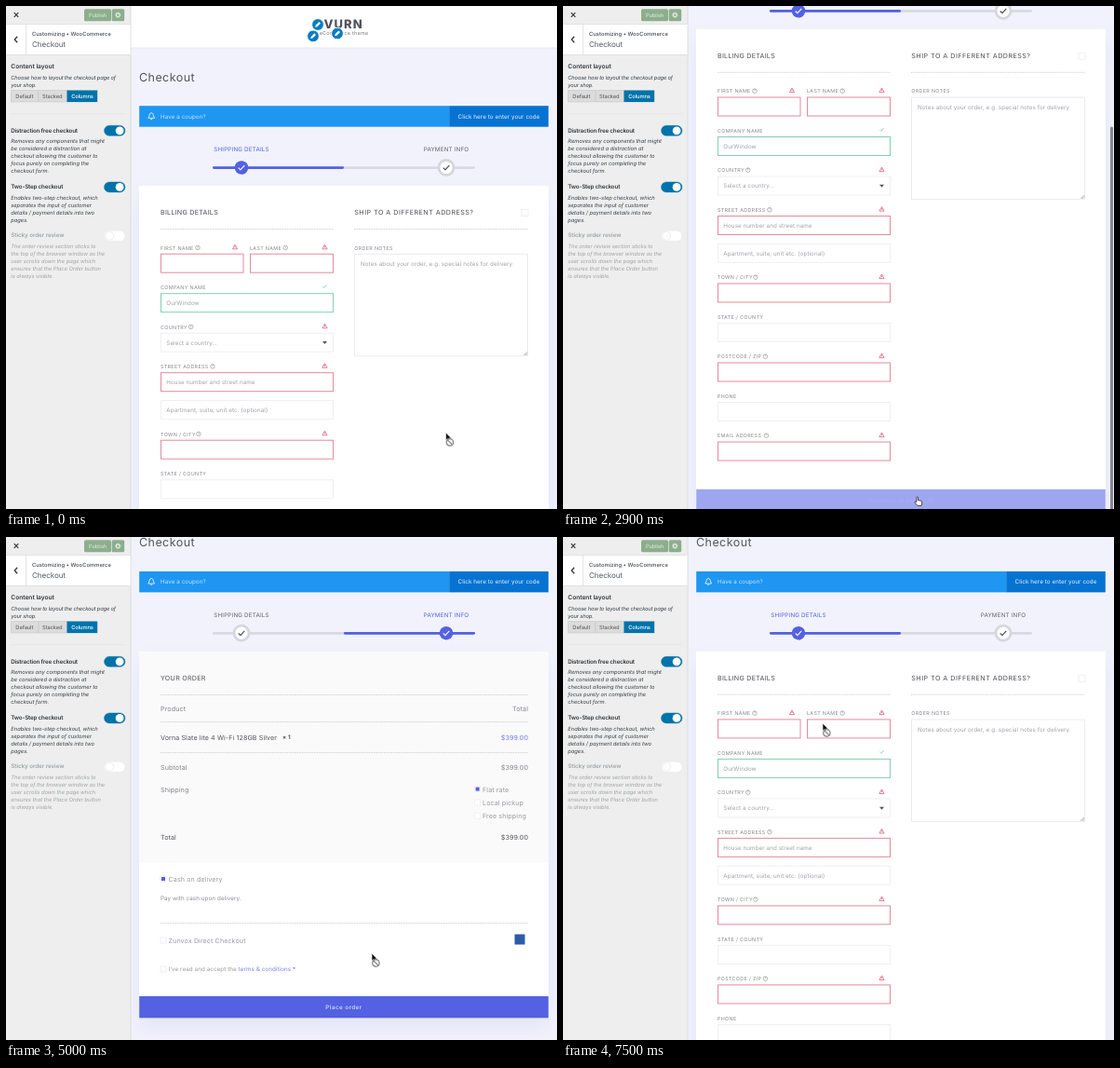
Recreate the animation shown at these times as an HTML page. Size 592 by 540 pixels, loop 7600 ms.

```html
<!DOCTYPE html>
<html lang="en">
<head>
<meta charset="utf-8">
<title>Checkout layout preview</title>
<style>
html, body { margin: 0; width: 100%; height: 100%; overflow: hidden; background: #f1f2fb; }
svg { display: block; width: 592px; height: 540px; font-family: Inter, "Open Sans", sans-serif; text-rendering: geometricPrecision; }
.card { filter: drop-shadow(0 12px 10px #5361e214); }
</style>
</head>
<body>
<svg id="stage" viewBox="0 0 592 540"></svg>
<script>
const BLUE = '#5361e2', RED = '#e58a9e', GREEN = '#80d0b0', PALE = '#f0f0f3', WP = '#0073aa';

// y is the vertical middle of the capitals
function text(x, y, str, { size = 6.26, fill = '#999', weight = 400, anchor = 'start', ls = .013, style = 'normal' } = {}) {
  return `<text x="${x}" y="${y + size * .36}" font-size="${size}" fill="${fill}" font-weight="${weight}" ` +
    `text-anchor="${anchor}" letter-spacing="${ls}em" font-style="${style}">${str}</text>`;
}
const rect = (x, y, w, h, fill, more = '') =>
  `<rect x="${x}" y="${y}" width="${w}" height="${h}" fill="${fill}" ${more}/>`;
const path = (d, stroke, width = 1, fill = 'none') =>
  `<path d="${d}" stroke="${stroke}" stroke-width="${width}" fill="${fill}" stroke-linejoin="round"/>`;
const circle = (x, y, r, fill, more = '') => `<circle cx="${x}" cy="${y}" r="${r}" fill="${fill}" ${more}/>`;
const box = (x, y, w, h, stroke) => rect(x + .5, y + .5, w - 1, h - 1, '#fff', `stroke="${stroke}"`);
const dotted = (x1, x2, y) => `<path d="M${x1} ${y}H${x2}" stroke="#cacace" stroke-width=".8" stroke-dasharray="1 .6"/>`;
const group = (id, content, more = '') => `<g id="${id}" ${more}>${content}</g>`;
const tick = (x, y, k, color, width) =>
  path(`M${x - 3 * k} ${y}l${2 * k} ${2 * k}l${4 * k} ${-4.4 * k}`, color, width);

/* ---------- sidebar ---------- */
function toggle(y, on) {
  return rect(105.5, y, 22.5, 11, on ? WP : '#fff', `rx="5.5" stroke="${on ? WP : '#e2e2e2'}" stroke-width=".4"`) +
    circle(on ? 122.1 : 111.3, y + 5.5, 4.4, '#fff', on ? '' : 'stroke="#ddd" stroke-width=".5"');
}
function section(y, title, lines, { on = true, size = 6.26, titleLs = -.03, ls = -.006 } = {}) {
  return text(5.3, y, title, { size, fill: on ? '#32373c' : '#a0a4a8', weight: 600, ls: titleLs }) +
    lines.map((s, i) => text(5.3, y + 11.6 + i * 8, s,
      { size: 5.81, fill: on ? '#3c4146' : '#a0a3a6', ls, style: 'italic', weight: 450 })).join('');
}
function sidebar() {
  const mid = { size: 5.81, ls: -.02, anchor: 'middle', fill: '#555' };
  return rect(0, 0, 134, 540, '#eee') + rect(133.5, 0, 1, 540, '#dcdcde') +
    path('M8.7 7.2l4.6 4.6M13.3 7.2l-4.6 4.6', '#32373c', 1.2) +
    rect(84, 3.2, 29, 13, '#8cae8c', 'rx="1.5"') + rect(113.7, 3.2, 13.5, 13, '#8cae8c', 'rx="1.5"') +
    text(98.6, 9.7, 'Publish', { ...mid, fill: '#e2ede2' }) +
    circle(120.3, 9.7, 1.8, 'none', 'stroke="#e8f1e8" stroke-width="1.2"') +
    circle(120.3, 9.7, 2.8, 'none', 'stroke="#e8f1e8" stroke-width=".8" stroke-dasharray="1.1 1.1"') +
    rect(0, 19, 133.5, 33.5, '#fff') + rect(0, 19, 133.5, .8, '#ddd') + rect(0, 52, 133.5, .8, '#ddd') + rect(21, 19, .8, 33, '#ddd') +
    path('M12.2 32.8l-3 3.2l3 3.2', '#32373c', 1.3) +
    text(28, 30, 'Customizing • WooCommerce', { size: 5.81, fill: '#444a50', ls: .008, weight: 500 }) +
    text(28, 41.6, 'Checkout', { size: 8.05, fill: '#555d66', ls: -.007 }) +
    section(65, 'Content layout', ['Choose how to layout the checkout page of', 'your shop.'], { size: 6.6, titleLs: 0, ls: -.03 }) +
    rect(5.5, 90.7, 60, 12.2, '#dcdcdc', 'stroke="#c8c8c8" stroke-width=".7"') + rect(34.5, 90.7, .7, 12.2, '#c2c2c2') +
    rect(65.5, 90.5, 32.7, 12.6, WP) +
    text(19.8, 97, 'Default', mid) + text(49.8, 97, 'Stacked', mid) + text(82, 97, 'Columns', { ...mid, fill: '#fff', weight: 500 }) +
    rect(5, 115.5, 123, .8, '#e6e6e6') +
    section(133.5, 'Distraction free checkout', ['Removes any components that might', 'be considered a distraction at',
      'checkout allowing the customer to', 'focus purely on completing the', 'checkout form.']) + toggle(128.3, true) +
    section(194, 'Two-Step checkout', ['Enables two-step checkout, which', 'separates the input of customer',
      'details / payment details into two', 'pages.']) + toggle(188.9, true) +
    section(246, 'Sticky order review', ['The order review section sticks to', 'the top of the browser window as the',
      'user scrolls down the page which', 'ensures that the Place Order button', 'is always visible.'], { on: false, titleLs: -.01 }) + toggle(241.3, false);
}

/* ---------- page header ---------- */
function pencil(x, y) {
  return circle(x, y, 6.4, '#0a7cc0', 'stroke="#fff" stroke-width="1"') +
    path(`M${x - 2.8} ${y + 2.8}l.6 -2.2l3.6 -3.6l1.6 1.6l-3.6 3.6z`, 'none', 0, '#fff');
}
function header() {
  return rect(134, 0, 458, 45, '#fff') + rect(134, 44.6, 458, .8, '#e4e4ee') +
    text(341.5, 19, 'VURN', { size: 13, fill: '#50525e', weight: 800, ls: .08 }) +
    text(363, 29, 'eCommerce theme', { size: 5.4, fill: '#777', anchor: 'middle', ls: .05 }) +
    pencil(335, 20) + pencil(330, 32.3) + pencil(356, 29.5) +
    text(143, 76.2, 'Checkout', { size: 12.5, fill: '#55555d', ls: .035 }) +
    rect(143.2, 107.2, 333, 22.5, '#1e96f2') + rect(476.2, 107.2, 106.6, 22.5, '#0673d2') +
    path('M152.8 120.3c1.4 -1 .8 -5.6 3.4 -5.6s2 4.6 3.4 5.6zM155.2 121.6h2', '#fff', .8) +
    text(166, 118.3, 'Have a coupon?', { fill: '#c5e4ff' }) +
    text(529.5, 118.3, 'Click here to enter your code', { fill: '#e6f3ff', anchor: 'middle' });
}
function steps(active) {
  const step = (x, label, on) =>
    text(x, 154, label, { fill: on ? BLUE : '#62626c', anchor: 'middle', ls: .03 }) +
    (on ? circle(x, 173.5, 7.3, BLUE) : circle(x, 173.5, 8, '#fff', 'stroke="#d6d6de" stroke-width="2.8"')) +
    tick(x, 173.7, 1.1, on ? '#fff' : '#44445c', 1.1);
  return rect(222, 172.2, 282, 2.8, '#d9d9e2', 'rx="1.4"') + rect(active ? 363 : 222, 172.2, 141, 2.8, BLUE, 'rx="1.4"') +
    step(253, 'SHIPPING DETAILS', !active) + step(473, 'PAYMENT INFO', active);
}

/* ---------- billing page ---------- */
const label = (x, y, str) => text(x, y, str, { size: 5.4, fill: '#85858d', ls: .06 });
const help = (x, y) => circle(x, y, 2.3, 'none', 'stroke="#888" stroke-width=".6"') +
  text(x, y, '?', { size: 3.6, fill: '#777', anchor: 'middle' });
const warn = (x, y) => path(`M${x} ${y - 2.4}l2.6 4.6h-5.2zM${x} ${y - .8}v1.6`, '#e2607c', .8);

function field(y, name, { x = 166, w = 186, state = '', stroke = { bad: RED, good: GREEN }[state] || PALE, hint = '', helpX = 0 } = {}) {
  const end = x + w - 9.5;
  return (name && label(x, y, name)) + (helpX ? help(helpX, y - .2) : '') +
    (state === 'bad' ? warn(end, y - 1) : '') + (state === 'good' ? tick(end, y - 1, .7, GREEN, .9) : '') +
    box(x, y + 6.1, w, 21, stroke) + text(x + 6.3, y + 16.8, hint, { fill: '#a2a2aa' });
}
function billing() {
  const bad = (helpX, more) => ({ state: 'bad', helpX, ...more });
  const title = { size: 7.15, fill: '#4c4c54' };
  return rect(143, 193, 440, 517, '#fff', 'class="card"') +
    text(166, 221.6, 'BILLING DETAILS', { ...title, ls: .035 }) + dotted(166, 352, 239.5) +
    text(374.3, 221.6, 'SHIP TO A DIFFERENT ADDRESS?', { ...title, ls: .067 }) + dotted(374, 561, 239.5) +
    box(553.5, 218, 8, 8, PALE) +
    field(259.6, 'FIRST NAME', bad(205.9, { w: 89.5 })) +
    field(259.6, 'LAST NAME', bad(300.2, { x: 262, w: 90 })) +
    field(302.1, 'COMPANY NAME', { state: 'good', hint: 'OurWindow' }) +
    field(344.6, 'COUNTRY', bad(198.7, { hint: 'Select a country…', stroke: PALE })) +
    path('M340 360h5l-2.5 3z', 'none', 0, '#555') +
    field(387.1, 'STREET ADDRESS', bad(221.9, { hint: 'House number and street name' })) +
    field(416.9, '', { hint: 'Apartment, suite, unit etc. (optional)' }) +
    field(459.6, 'TOWN / CITY', bad(206.9)) +
    field(502.1, 'STATE / COUNTY') +
    field(544.6, 'POSTCODE / ZIP', bad(217.4)) +
    field(587.1, 'PHONE') +
    field(629.6, 'EMAIL ADDRESS', bad(218.5)) +
    label(374.3, 259.6, 'ORDER NOTES') + box(374, 265.8, 187, 110.5, '#ececf0') +
    text(381, 277.2, 'Notes about your order, e.g. special notes for delivery.', { fill: '#a2a2aa' }) +
    path('M556.5 375l3.5 -3.5M558.5 375l1.5 -1.5', '#777', .7) +
    group('next', rect(143.2, 687, 439.6, 23.3, BLUE)) +
    group('nextText', text(363, 698.8, 'Continue to payment', { fill: '#e4e6ff', anchor: 'middle', weight: 500, ls: .06 }));
}

/* ---------- payment page, laid out at its resting scroll ---------- */
const REST = 70.3;

function payment() {
  const big = { size: 7.15, fill: '#85858d' }, dark = { ...big, fill: '#55555d' };
  const right = (y, str, style) => text(561, y, str, { ...style, anchor: 'end' });
  const choice = (x, y, on) => box(x - 3.5, y - 3.5, 7, 7, PALE) + (on ? rect(x - 2, y - 2, 4, 4, BLUE) : '');
  return rect(143, 123, 440, 393, '#fff', 'class="card"') + rect(143, 123, 440, 226.5, '#fafafa') +
    text(166, 151.3, 'YOUR ORDER', { ...dark, ls: .035 }) +
    [169.5, 198.5, 231.5, 414.5].map(y => dotted(166, 561, y)).join('') +
    text(166, 184, 'Product', big) + right(184, 'Total', big) +
    text(166, 215, 'Vorna Slate lite 4 Wi-Fi 128GB Silver', dark) +
    text(297, 215, '× 1', { fill: '#44444c', weight: 600 }) + right(215, '$399.00', { ...big, fill: '#6f7ae8' }) +
    text(166, 247.3, 'Subtotal', big) + right(247.3, '$399.00', big) +
    text(166, 271, 'Shipping', big) +
    ['Flat rate', 'Local pickup', 'Free shipping'].map((s, i) =>
      choice(506.6, 270.6 + i * 14.4, !i) + text(512, 271 + i * 14.4, s, { ...big, fill: '#9a9aa2' })).join('') +
    text(166, 322.8, 'Total', dark) + right(322.8, '$399.00', dark) +
    choice(169, 367, true) + text(174.5, 367.4, 'Cash on delivery', { ...big, fill: '#9a9aa2' }) +
    text(166, 387.3, 'Pay with cash upon delivery.', { fill: '#8c8c94' }) +
    choice(169, 433, false) + text(174.5, 433, 'Zunvox Direct Checkout', { ...big, fill: '#9a9aa2' }) +
    rect(546.5, 426.5, 11, 11, '#2a5ca8') +
    choice(169, 464, false) +
    text(174.5, 464, `I’ve read and accept the <tspan fill="#7681e8">terms &amp; conditions</tspan> <tspan fill="${BLUE}">*</tspan>`) +
    rect(143.2, 493, 439.6, 23.3, BLUE) +
    text(363, 504.8, 'Place order', { fill: '#dfe2ff', weight: 500, anchor: 'middle', ls: .075 });
}

/* ---------- pointer ---------- */
const pointer =
  group('arrow', path('M0 0v8.2l1.9 -1.7l1.3 3l1.5 -.6l-1.3 -3h2.6z', '#fff', .6, '#111')) +
  group('ban', circle(4.4, 10.4, 3.7, '#f4f4f4', 'stroke="#808080" stroke-width="1.2"') + path('M1.9 7.9l5 5', '#808080', 1.2)) +
  group('hand', path('M-1 4.5v-5c0 -1.2 1.6 -1.2 1.6 0v2.8l3.4 .8c.9 .3 1 1 .9 1.8l-.7 3.3h-4.2l-2.6 -3c-.6 -1 .6 -1.8 1.6 -.7z', '#222', .8, '#fff'));

const stage = document.getElementById('stage');
stage.innerHTML = rect(134, 0, 458, 540, '#f1f2fb') +
  group('page', header() + group('steps0', steps(false)) + group('steps1', steps(true)) +
    group('billing', billing()) + group('payment', payment(), `transform="translate(0 ${REST})"`)) +
  rect(588, 0, 3, 418, '#85868e', 'rx="1.5" id="bar"') + sidebar() + group('pointer', pointer);

const part = Object.fromEntries([...stage.querySelectorAll('[id]')].map(e => [e.id, e]));

/* ---------- motion ---------- */
const LOOP = 7600, TO_PAYMENT = 3470, TO_BILLING = 6900, FADE = 400;
const scrollKeys = [[0, 0], [1600, 0], [1700, 15.7], [1900, 65], [2100, 115], [2300, 150], [2600, 168.2],
  [TO_PAYMENT - 1, 168.2], [TO_PAYMENT, REST], [LOOP, REST]];
const pointerKeys = [[0, 472.5, 458], [500, 472.5, 458], [1500, 399, 440], [1700, 398.5, 439], [2200, 398.5, 440], [2600, 381, 527],
  [3600, 380.5, 531], [4200, 380.5, 531], [5000, 393, 447], [6000, 350, 293], [6400, 255, 97], [6700, 255, 97], [7500, 279, 200], [LOOP, 279, 200]];

const clamp = v => Math.min(1, Math.max(0, v));
const swing = (t, start, length) => .5 - Math.cos(Math.PI * clamp((t - start) / length)) / 2;
function track(keys, t) {
  const i = keys.findIndex(k => k[0] > t), a = keys[i - 1], b = keys[i];
  const p = (t - a[0]) / (b[0] - a[0]);
  return a.slice(1).map((v, n) => v + (b[n + 1] - v) * p);
}
const fade = (el, o) => { el.setAttribute('opacity', o); el.style.display = o > 0 ? '' : 'none'; };

function draw(now) {
  const t = Math.floor(now % LOOP / 100) * 100;
  const paying = t >= TO_PAYMENT && t < TO_BILLING;
  const [scroll] = track(scrollKeys, t), [x, y] = track(pointerKeys, t);

  part.page.setAttribute('transform', `translate(0 ${-scroll})`);
  fade(part.steps0, +!paying);
  fade(part.steps1, +paying);
  fade(part.billing, t < TO_PAYMENT ? 1 - swing(t, TO_PAYMENT - FADE, FADE) : swing(t, TO_BILLING, FADE));
  fade(part.payment, paying ? swing(t, TO_PAYMENT, FADE) - swing(t, TO_BILLING - FADE, FADE) : 0);

  const pressed = t < TO_BILLING ? swing(t, 2700, 200) : 0;
  fade(part.next, 1 - .44 * pressed);
  fade(part.nextText, 1 - .88 * pressed);

  part.bar.setAttribute('y', scroll * (t < TO_PAYMENT ? .77 : .9));
  part.bar.setAttribute('height', t < TO_PAYMENT ? 420 : 477);
  fade(part.bar, t < 1700 ? 0 : 1 - swing(t, 4200, 300));

  const hand = t >= 2500 && t < 3500 || t >= 6400 && t < 6800;
  part.pointer.setAttribute('transform', `translate(${x} ${y})`);
  fade(part.hand, +hand);
  fade(part.arrow, +!hand);
  fade(part.ban, +!(hand || t >= 3500 && t < 4300));
}

const start = performance.now();
(function frame() {
  draw(performance.now() - start);
  requestAnimationFrame(frame);
})();
</script>
</body>
</html>
```
